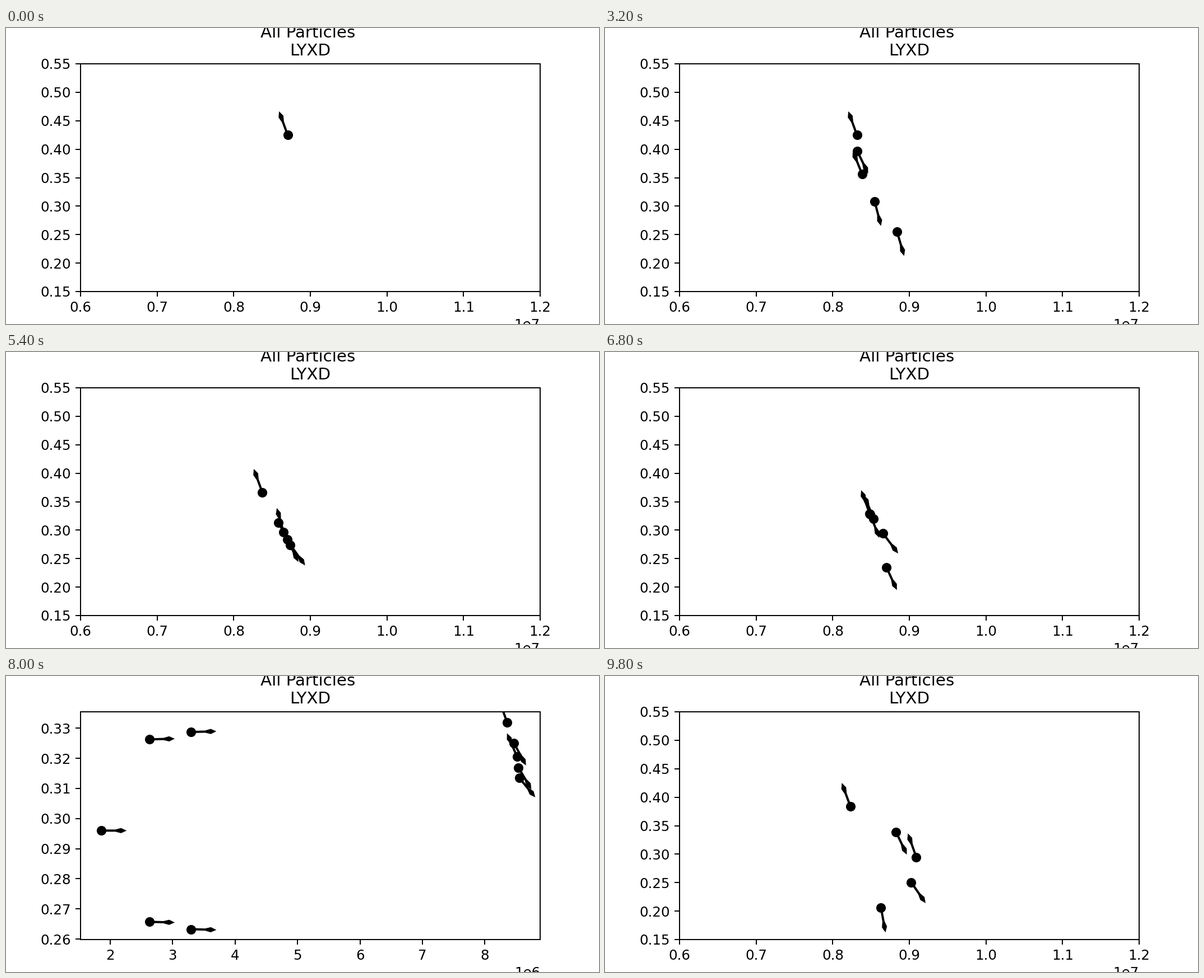
These frames come from a looping animation (1058 px wide and 529 px high, 10000 ms). A matplotlib script:

```python
import numpy as np
import matplotlib.pyplot as plt
from matplotlib.animation import FuncAnimation

W, H = 1058, 529
LEFT, BOTTOM, WIDTH, HEIGHT = 133, 58, 820, 407     # axes box in pixels
FRAMES, N = 50, 5                                   # N particles per group
ARROW = 45                                          # arrow length in pixels
XLIM, YLIM = (0.6e7, 1.2e7), (0.15, 0.55)
AUTO = range(35, 45)                                # axes follow the data
OMEGA = 0.4 * np.pi                                 # swing per frame

# The swarm lies on a bowed line between two ends (x in 1e7):
# frame, x and y of one end, x and y of the other, bunching, bow
STOPS = np.array([
    (0, 0.8704, 0.425, 0.870, -0.27, 0.5, 0),
    (8, 0.8352, 0.338, 0.856, 0.151, 2, 0.015),
    (16, 0.8316, 0.425, 0.884, 0.255, 1.3, -0.015),
    (27, 0.8374, 0.366, 0.874, 0.274, 0.4, 0),
    (34, 0.8484, 0.3285, 0.870, 0.235, 3.5, 0.01),
    (35, 0.840, 0.312, 0.855, 0.297, 0.7, 0.004),
    (40, 0.8355, 0.332, 0.855, 0.3135, 0.7, 0.004),
    (44, 0.840, 0.312, 0.855, 0.297, 0.7, 0.004),
    (49, 0.8231, 0.3835, 0.863, 0.206, 1, 0.066),
])

rng = np.random.default_rng(4)
rank = np.arange(N)
swing = rng.uniform(40, 90, N)                      # pixels
tilt = rng.uniform(-4, 4, (FRAMES, N)) * rank       # degrees
base_angle = np.where((rank == 0) | (rank == 2), 110, -65)

plt.rcParams["font.family"] = "DejaVu Sans"
fig = plt.figure(figsize=(6, 3), dpi=W / 6)
ax = fig.add_axes([LEFT / W, BOTTOM / H, WIDTH / W, HEIGHT / H])
ax.set_title("All Particles \nLYXD")


def swarm(i):
    """Particles that swing along their heading around the bowed line."""
    times = STOPS[:, 0]
    x0, y0, x1, y1, power, bow = (np.interp(i, times, col)
                                  for col in STOPS[:, 1:].T)
    p = (rank / (N - 1)) ** power
    x = x0 + (x1 - x0) * p + 4 * bow * p * (1 - p)
    y = y0 + (y1 - y0) * p

    phase = OMEGA * (i - times[np.argmin(abs(times - i))])
    angle = np.radians(base_angle + tilt[i])
    u, v = np.cos(angle), np.sin(angle)
    reach = swing * np.sin(phase) * (0.03 if i in AUTO else 1)
    x = x * 1e7 + reach * u * (XLIM[1] - XLIM[0]) / WIDTH
    y = y + reach * v * (YLIM[1] - YLIM[0]) / HEIGHT
    turn = np.sign(np.cos(phase))
    return x, y, u * turn, v * turn


def trail(i):
    """Latecomers that drift to the right in a wedge."""
    q = rank - N // 2
    squeeze = 1 - 0.1 * abs(i - 40)
    x = 1.86e6 + 0.77e6 * abs(q) ** 0.9 + 0.24e6 * (i - 40)
    y = 0.296 + 0.036 * np.sin(q) * squeeze
    return x, y, np.ones(N), 0.03 * np.sin(q)


def particles(i):
    return np.hstack([swarm(i), trail(i)])


x, y, u, v = particles(0)
dots, = ax.plot(x, y, "ko", markersize=6)
arrows = ax.quiver(x, y, ARROW * u, ARROW * v, color="black",
                   angles="uv", units="dots", scale_units="dots", scale=1,
                   width=4, headwidth=2.3, headlength=2.5, headaxislength=5)


def padded(values):
    pad = 0.05 * np.ptp(values)
    return values.min() - pad, values.max() + pad


def draw(i):
    x, y, u, v = particles(i)
    dots.set_data(x, y)
    arrows.set_offsets(np.column_stack([x, y]))
    arrows.set_UVC(ARROW * u, ARROW * v)
    ax.set_xlim(padded(x) if i in AUTO else XLIM)
    ax.set_ylim(padded(y) if i in AUTO else YLIM)
    return dots, arrows


anim = FuncAnimation(fig, draw, frames=FRAMES, interval=200,
                     repeat=True, repeat_delay=0, blit=False)
plt.show()
```
